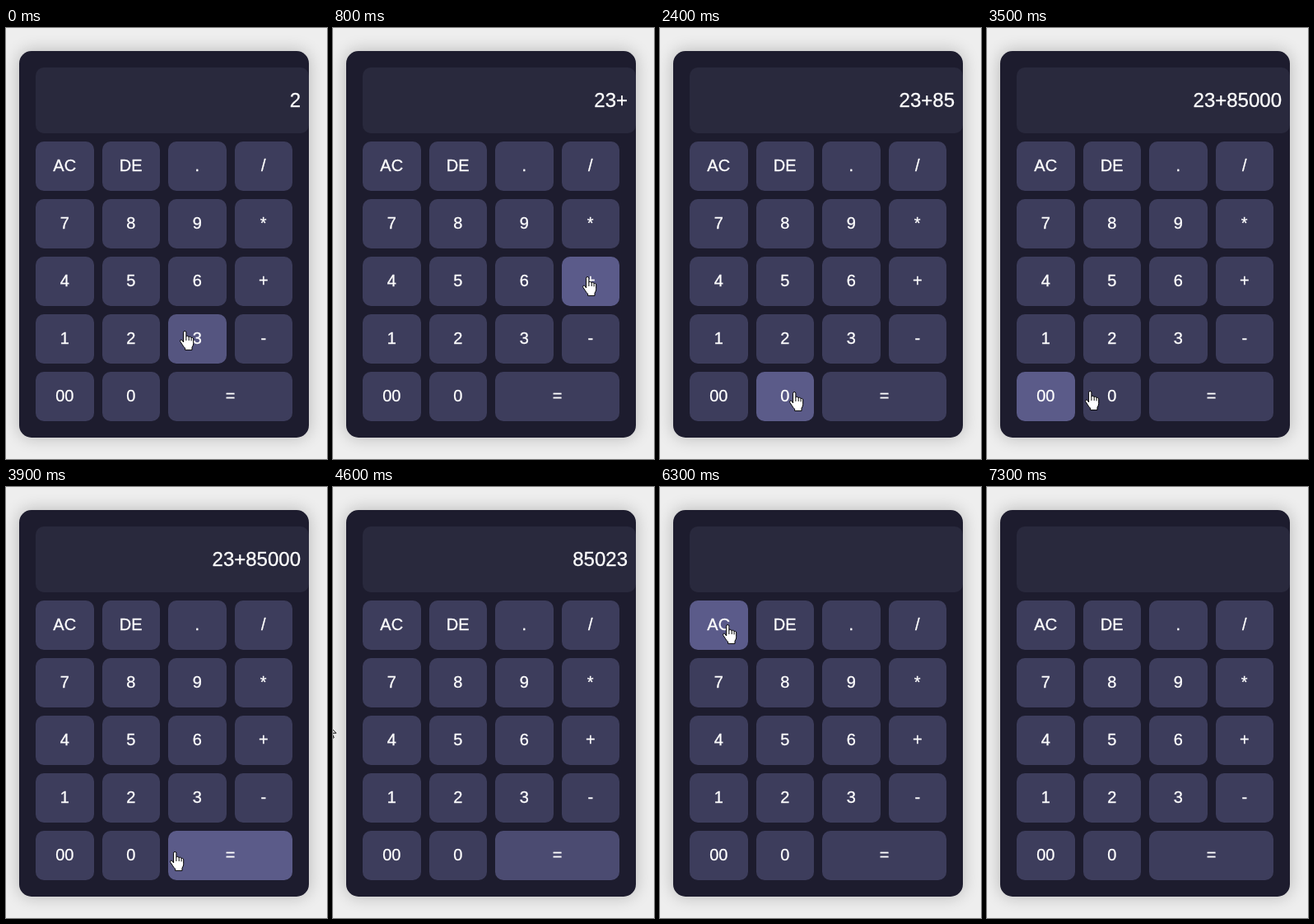
An HTML page for the animation above (7.4 s loop, 390 by 524 pixels).

```html
<!DOCTYPE html>
<html lang="en">
<head>
<meta charset="utf-8">
<title>Calculator</title>
<style>
  html, body { margin: 0; width: 100%; height: 100%; overflow: hidden; background: #eee; }
  body {
    position: relative; color: #fff; cursor: default;
    font-family: "Liberation Sans", Arial, sans-serif; -webkit-text-stroke: .3px #fff;
  }
  #calculator {
    position: absolute; left: 16px; top: 28px; width: 352px; height: 470px;
    border-radius: 15px; background: #1d1c2e; box-shadow: 0 0 20px rgba(0, 0, 0, .24);
  }
  #display {
    position: absolute; left: 20px; top: 20px; width: 322px; height: 80px; padding-right: 10px;
    border-radius: 10px; background: #29293d; font-size: 24px; line-height: 80px; text-align: right;
  }
  #keys {
    position: absolute; left: 20px; top: 110px; width: 312px;
    display: grid; grid-template-columns: repeat(4, 1fr); grid-auto-rows: 60px; gap: 10px;
  }
  #keys div { border-radius: 10px; font-size: 20px; line-height: 58px; text-align: center; }
  #keys div:last-child { grid-column: span 2; }
  #pointer { position: absolute; left: 0; top: 0; width: 24px; height: 28px; overflow: visible; }
  #pointer path { fill: #fff; stroke: #000; stroke-width: 1; stroke-linejoin: round; }
</style>
</head>
<body>
<div id="calculator">
  <div id="display"></div>
  <div id="keys"></div>
</div>
<svg id="pointer">
  <path id="arrow" d="M.5 .5V16.5L4.2 13L6.8 18.8L9.2 17.7L6.7 12.2H11.8Z"/>
  <g id="hand" transform="translate(-6 0)">
    <path d="M4.6 14V2.2Q4.6 .5 6.2 .5T7.9 2.2V7.4Q8.3 6.3 9.6 6.4T11.2 8Q11.5 7 12.7 7.2T14.1 8.9Q14.4 8.1 15.4 8.4T16.7 10V15.5Q16.7 18 15 20.2V23.4H6.6V21.2Q4.6 19.6 3.4 17.2L.9 13.4Q.2 11.9 1.3 11.2T3.3 12Z"/>
    <path d="M7.9 7.4V12M11.2 8V12M14.1 8.9V12.4" style="fill:none"/>
  </g>
</svg>
<script>
const LOOP = 7400;
const FADE = 300;  // duration of a key's colour change
const LAG = 10;    // hovering trails the pointer slightly
const STEP = 10;   // sampling step for hover fades

// Where the pointer rests; the key under it is pressed halfway through the stay.
const stops = [
  { from: -650, to: -650, x: 140, y: 372 },
  { from: 0, to: 300, x: 217, y: 368 },
  { from: 600, to: 900, x: 309, y: 302 },
  { from: 1300, to: 1600, x: 152, y: 240 },
  { from: 1800, to: 1900, x: 154, y: 308 },
  { from: 2200, to: 2700, x: 163, y: 442 },
  { from: 2900, to: 3400, x: 84, y: 440 },
  { from: 3660, to: 4410, x: 205, y: 443 },
  { from: 4620, to: 5000, x: -13, y: 283 },
  { from: 5300, to: 5650, x: 164, y: 166 },
  { from: 5950, to: 6500, x: 82, y: 167 },
  { from: 6800, to: LOOP, x: 100, y: -40 }
];

const $ = id => document.getElementById(id);
const clamp = k => Math.min(1, Math.max(0, k));
const ease = k => k * k * (3 - 2 * k);
const mix = (a, b, k) => a + (b - a) * k;

const keys = 'AC DE . / 7 8 9 * 4 5 6 + 1 2 3 - 00 0 ='.split(' ').map(label => {
  const element = document.createElement('div');
  element.textContent = label;
  $('keys').append(element);
  return { label, element };
});
for (const key of keys) key.box = key.element.getBoundingClientRect();

const keyUnder = ({ x, y }) => keys.find(({ box }) =>
  x >= box.left && x < box.right && y >= box.top && y < box.bottom);

function pointerAt(t) {
  const next = stops.findIndex(stop => stop.from > t);
  if (next === 0) return stops[0];
  const a = stops.at(next < 0 ? -1 : next - 1);
  const b = next < 0 ? a : stops[next];
  const k = t <= a.to ? 0 : ease((t - a.to) / (b.from - a.to));
  return { x: mix(a.x, b.x, k), y: mix(a.y, b.y, k) };
}

function press(text, label) {
  if (label === 'AC') return '';
  if (label === 'DE') return text.slice(0, -1);
  if (label === '=') return String(text.split('+').reduce((sum, n) => sum + Number(n), 0));
  return text + label;
}

function displayAt(t) {
  return stops.filter(({ from, to }) => (from + to) / 2 <= t)
    .map(keyUnder)
    .reduce((text, key) => key ? press(text, key.label) : text, '');
}

// Fade every key up while hovered and down afterwards, over the recent past.
function hoverLevels(t) {
  const levels = keys.map(() => 0);
  for (let s = t - 2 * FADE; s <= t; s += STEP) {
    const hovered = keyUnder(pointerAt(s - LAG));
    keys.forEach((key, i) => {
      levels[i] = clamp(levels[i] + (key === hovered ? STEP : -STEP) / FADE);
    });
  }
  return levels;
}

function draw(t) {
  $('display').textContent = displayAt(t);
  hoverLevels(t).forEach((level, i) => {
    const k = ease(level), gray = mix(61, 91, k);
    keys[i].element.style.background = `rgb(${gray}, ${gray}, ${mix(92, 138, k)})`;
  });
  const { x, y } = pointerAt(t);
  const overKey = keyUnder(pointerAt(t - LAG));
  $('pointer').style.transform = `translate(${Math.round(x)}px, ${Math.round(y)}px)`;
  $('hand').style.display = overKey ? '' : 'none';
  $('arrow').style.display = overKey ? 'none' : '';
}

const start = performance.now();
function frame() {
  draw((performance.now() - start) % LOOP);
  requestAnimationFrame(frame);
}
frame();
</script>
</body>
</html>
```
